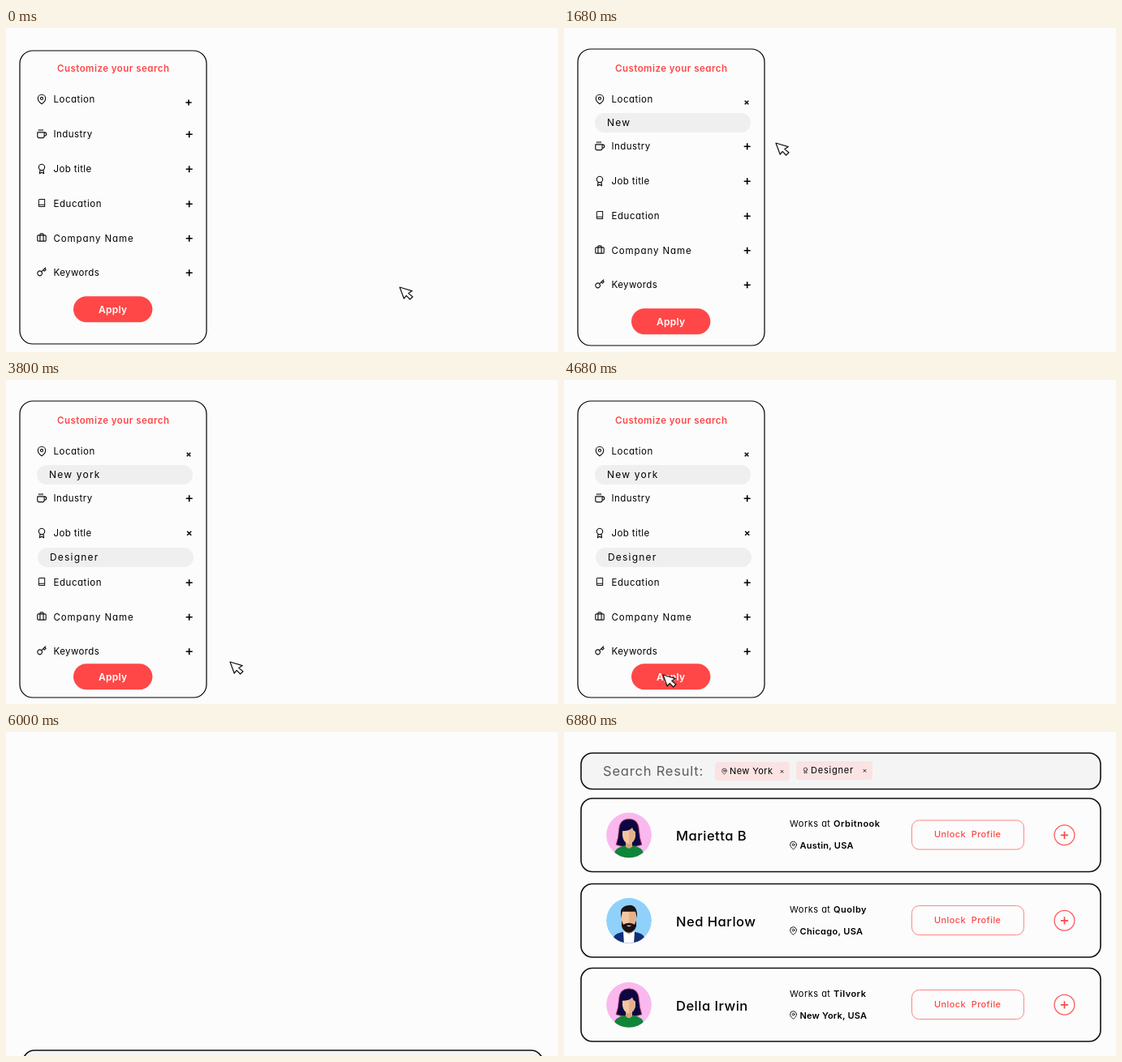
Animation, 680 px wide and 400 px high, one loop 7.5 s. Source, as an HTML page:

```html
<!DOCTYPE html>
<html lang="en">
<head>
<meta charset="utf-8">
<title>Search filters</title>
<style>
  html, body { margin: 0; width: 100%; height: 100%; overflow: hidden; background: #fcfcfc; }
  svg { display: block; }
  text { font-family: Inter, "Open Sans", sans-serif; font-feature-settings: "cv11"; }
  .icon { fill: none; stroke: #111; stroke-width: 2.2; stroke-linecap: round; stroke-linejoin: round; }
  .line { fill: none; stroke: #000; }
</style>
</head>
<body>
<svg id="stage" width="680" height="400" viewBox="0 0 680 400">
  <defs>
    <filter id="smear" x="-2%" y="-10%" width="104%" height="120%"><feGaussianBlur stdDeviation="0 0.75"/></filter>
    <clipPath id="disc"><circle r="28"/></clipPath>
    <g id="woman" clip-path="url(#disc)">
      <circle r="28" fill="#f9b9ef"/>
      <path d="M-16 12Q-13 4-12.500-6Q-12-20 0-20Q12-20 12.500-6Q13 4 16 12Q8 15 0 14Q-8 15-16 12Z" fill="#0d0642" stroke="#e0506a" stroke-width="0.8"/>
      <path d="M-18 30V22Q-17 16-6 13H6Q17 16 18 22V30Z" fill="#10853a"/>
      <path d="M-4 6H4V14Q0 19-4 14Z" fill="#d9a27c"/>
      <path d="M-8-5Q1-5 4-9Q5-5 8-4V1Q7 9 0 11Q-7 9-8 1Z" fill="#f3c6a2"/>
      <path d="M0-5.500Q3-7 4-9Q5-5 8-4V1Q7 9 0 11Z" fill="#e6b18a"/>
    </g>
    <g id="man" clip-path="url(#disc)">
      <circle r="28" fill="#8fd1fb"/>
      <path d="M-19 30V21Q-18 16-7 14H7Q18 16 19 21V30Z" fill="#122f78"/>
      <path d="M-7 13L0 16L7 13L6 30H-6Z" fill="#fff"/>
      <path d="M-5 6H5V13L0 17L-5 13Z" fill="#dca57d"/>
      <path d="M-9-11H9V4Q7 11 0 12Q-7 11-9 4Z" fill="#f3c6a2"/>
      <path d="M0-11H9V4Q7 11 0 12Z" fill="#e6b18a"/>
      <path d="M-10-3V-12Q-8-19 2-19Q11-18 10-3L8-11H-8Z" fill="#191414"/>
      <path d="M-9 0L-7 5Q0 1 7 5L9 0V7Q7 14 0 15Q-7 14-9 7Z" fill="#191414"/>
      <path d="M-3 6H3Q0 9-3 6Z" fill="#f0d0bd"/>
    </g>
  </defs>
  <g id="panel"></g>
  <g id="results"></g>
  <path id="cursor" d="M0 0L15.3 4.6L10.8 7.6L16 11.8L12.6 15L8.2 10.4L5.2 14Z" fill="#fff" stroke="#111" stroke-width="1.2" stroke-linejoin="round"/>
</svg>
<script>
const LOOP = 7500, STEP = 20, RED = '#ff4747';
const $ = id => document.getElementById(id);

const icons = {
  pin: 'M21 10c0 7-9 13-9 13s-9-6-9-13a9 9 0 0 1 18 0zM15 10a3 3 0 1 1-6 0a3 3 0 0 1 6 0z',
  cup: 'M18 8h1a4 4 0 0 1 0 8h-1M2 8h16v9a4 4 0 0 1-4 4H6a4 4 0 0 1-4-4zM6 1v3M10 1v3M14 1v3',
  award: 'M19 8a7 7 0 1 1-14 0a7 7 0 0 1 14 0zM8.2 13.9L7 23l5-3 5 3-1.2-9.1',
  book: 'M4 19.5A2.5 2.5 0 0 1 6.5 17H20M6.5 2H20v20H6.5A2.5 2.5 0 0 1 4 19.5v-15A2.5 2.5 0 0 1 6.5 2z',
  bag: 'M4 7h16a2 2 0 0 1 2 2v10a2 2 0 0 1-2 2H4a2 2 0 0 1-2-2V9a2 2 0 0 1 2-2zM16 21V5a2 2 0 0 0-2-2h-4a2 2 0 0 0-2 2v16',
  key: 'M21 2l-9.6 9.6a5.5 5.5 0 1 1-7.8 7.8a5.5 5.5 0 0 1 7.8-7.8M15.5 7.5l3 3L22 7l-3-3'
};

// Drawing helpers
const text = (x, y, size, str, {weight = 400, gap = 0.5, fill = '#000', anchor = 'start', id = ''} = {}) =>
  `<text id="${id}" x="${x}" y="${y}" font-size="${size}" font-weight="${weight}" letter-spacing="${gap}" text-anchor="${anchor}" fill="${fill}">${str}</text>`;
const icon = (name, x, y, size) =>
  `<path class="icon" d="${icons[name]}" transform="translate(${x - size / 2} ${y - size / 2}) scale(${size / 24})"/>`;
const box = (x, y, w, h, r, attrs) =>
  `<rect x="${x}" y="${y}" width="${w}" height="${h}" rx="${r}" ${attrs}/>`;
const plus = (x, y, r, color, width, turn = 0) =>
  `<path d="M${-r} 0H${r}M0 ${-r}V${r}" transform="translate(${x} ${y}) rotate(${turn})" stroke="${color}" stroke-width="${width}"/>`;

// Filter panel: name, icon, y, letter gap, icon size
const rows = [
  ['Location', 'pin', 88, 0.5, 12.5],
  ['Industry', 'cup', 131, 0.45, 12.5],
  ['Job title', 'award', 174, 0.4, 12.5],
  ['Education', 'book', 217, 0.55, 11],
  ['Company Name', 'bag', 259.5, 0.9, 12.5],
  ['Keywords', 'key', 302, 0.4, 12.5]
];
const fields = [{x: 38, y: 105, word: 'New york', start: 1330}, {x: 39, y: 207, word: 'Designer', start: 2790}];

$('panel').innerHTML =
  box(17, 28, 230, 362, 16, 'id="frame" class="line" stroke-width="1.2"') +
  text(132.2, 53.7, 11.5, 'Customize your search', {weight: 600, gap: 0.47, fill: RED, anchor: 'middle'}) +
  fields.map((f, i) => `<g id="field${i}">${box(f.x, f.y, 192, 24, 12, 'fill="#efefef"')}` +
    text(f.x + 15, f.y + 16, 12, '', {gap: 1.2, id: 'word' + i}) + '</g>').join('') +
  rows.map(([name, sign, y, gap, size], i) => `<g id="row${i}">` +
    icon(sign, 44, y - (i > 2 ? 1 : 0), size) + text(58.5, y + 4.2, 11.5, name, {gap}) +
    `<g id="plus${i}">${plus(0, 0, i ? 4 : 3.6, '#000', 1.6)}</g></g>`).join('') +
  `<g id="apply">${box(-48.7, -16, 97.4, 32, 16, `fill="${RED}"`)}` +
  text(0, 4.8, 12, 'Apply', {weight: 600, gap: 0.3, fill: '#fff', anchor: 'middle'}) + '</g>';

// Results: avatar, name, company, city, city gap, top, distance still to rise at 6480 ms
const cards = [
  ['woman', 'Marietta B', 'Orbitnook', 'Austin, USA', 0.25, 82, 75.5],
  ['man', 'Ned Harlow', 'Quolby', 'Chicago, USA', 0.35, 187.5, 108.5],
  ['woman', 'Della Irwin', 'Tilvork', 'New York, USA', 0.2, 291.5, 142]
];
const tag = (x, y, w, sign, word, gap) =>
  box(x, y, w, 23, 4, 'fill="#fbe3e3"') + icon(sign, x + 11.5, y + 11.5, 7.5) +
  text(x + 18, y + 15.4, 11, word, {gap}) + plus(x + w - 9.5, y + 11.8, 2.4, '#111', 0.9, 45);
const card = ([face, name, firm, city, gap], i) => `<g id="card${i}">` +
  box(21, 0, 640, 90.5, 14, 'fill="#fcfcfc" stroke="#111" stroke-width="1.6"') +
  `<use href="#${face}" transform="translate(80 45.3)"/>` +
  text(138, 52, 16.5, name, {weight: 500}) +
  text(278, 35, 11, `Works at <tspan font-weight="600">${firm}</tspan>`) +
  icon('pin', 282.5, 58, 10.5) + text(290.5, 62.2, 11, city, {weight: 600, gap}) +
  box(428.5, 27, 138, 36, 9, 'fill="none" stroke="#ff8585"') +
  text(497.2, 48, 11, 'Unlock\u00a0 Profile', {weight: 500, gap: 0.4, fill: RED, anchor: 'middle'}) +
  `<circle cx="616.5" cy="45.3" r="12.4" fill="none" stroke="#ff5a5a" stroke-width="1.3"/>` +
  plus(616.5, 45.3, 4.6, RED, 1.7) + '</g>';

$('results').innerHTML = `<g id="bar">${box(21, 26, 640, 44.5, 14, 'fill="#f4f4f4" stroke="#111" stroke-width="1.6"')}` +
  text(48, 54, 16.5, 'Search Result:', {gap: 0.8, fill: '#5c5c5c'}) +
  tag(186, 37, 92, 'pin', 'New York', 0.4) + tag(286, 36, 94, 'award', 'Designer', 0.8) + '</g>' +
  cards.map(card).join('');

// Timing helpers
const span = (t, a, b) => Math.min(1, Math.max(0, (t - a) / (b - a)));
const smooth = u => u * u * (3 - 2 * u);
const move = (el, x, y, extra = '') => el.setAttribute('transform', `translate(${x} ${y}) ${extra}`);

// Pointer path: time, x, y, eased
const path = [
  [20, 485, 320], [1000, 225, 92, 1], [1260, 225, 92], [1680, 261, 142], [1940, 273, 159], [2280, 243, 178],
  [2440, 226, 190], [2740, 226, 190], [2860, 230, 197], [3060, 240, 213], [3460, 265, 280],
  [3800, 276, 348], [4480, 122, 364, 1], [4720, 122, 364], [5020, 122, 410, 1]
];
function pointer(t) {
  let i = 1;
  while (i < path.length - 1 && t > path[i][0]) i++;
  const [t0, x0, y0] = path[i - 1], [t1, x1, y1, eased] = path[i];
  const s = span(t, t0, t1), u = eased ? smooth(s) : s;
  return [x0 + (x1 - x0) * u, y0 + (y1 - y0) * u];
}

function drawPanel(t) {
  const stay = 1 - smooth(span(t, 4700, 5060));
  const a = smooth(span(t, 1000, 1300)) * stay;
  const b = smooth(span(t, 2450, 2760)) * stay;
  const leave = span(t, 5450, 5840);
  move($('panel'), -250 * leave * leave, 0);
  $('panel').style.display = t < 5840 ? '' : 'none';
  $('frame').setAttribute('y', 28 - 2 * a);
  $('frame').setAttribute('height', 362 + 4 * a);

  rows.forEach(([, , y], i) => {
    move($('row' + i), 0, (i > 0 ? 15 * a : 0) + (i > 2 ? 18 * b : 0));
    const open = i === 0 ? a : i === 2 ? b : 0;
    move($('plus' + i), i ? 225.7 : 225, i ? y + 0.2 : 92, `rotate(${45 * open}) scale(${1 - 0.1 * open})`);
  });
  fields.forEach((f, i) => {
    $('field' + i).style.opacity = i ? b : a;
    const count = Math.max(0, Math.floor((t - f.start) / 110) + 1);
    $('word' + i).textContent = f.word.slice(0, count);
  });
  const press = Math.sin(Math.PI * span(t, 4460, 4640));
  move($('apply'), 131.7, 347.2 + 15 * a + 4 * b, `scale(${1 - 0.04 * press})`);
}

function rise(el, y, off) {
  move(el, 0, y + off);
  if (off > 0.5) el.setAttribute('filter', 'url(#smear)');
  else el.removeAttribute('filter');
}

function drawResults(t) {
  $('results').style.display = t >= 6000 ? '' : 'none';
  rise($('bar'), 0, 367 * (1 - span(t, 6000, 6440)) ** 1.7);
  const left = Math.max(0, (6880 - t) / 400);
  cards.forEach((c, i) => rise($('card' + i), c[5], c[6] * left * left));
}

function render(t) {
  drawPanel(t);
  drawResults(t);
  move($('cursor'), ...pointer(t));
  $('cursor').style.display = t < 5020 ? '' : 'none';
}

// The picture advances in steps of 20 ms
const begin = performance.now();
function tick() {
  const t = (performance.now() - begin) % LOOP;
  render(Math.floor(t / STEP) * STEP);
  requestAnimationFrame(tick);
}
tick();
</script>
</body>
</html>
```
